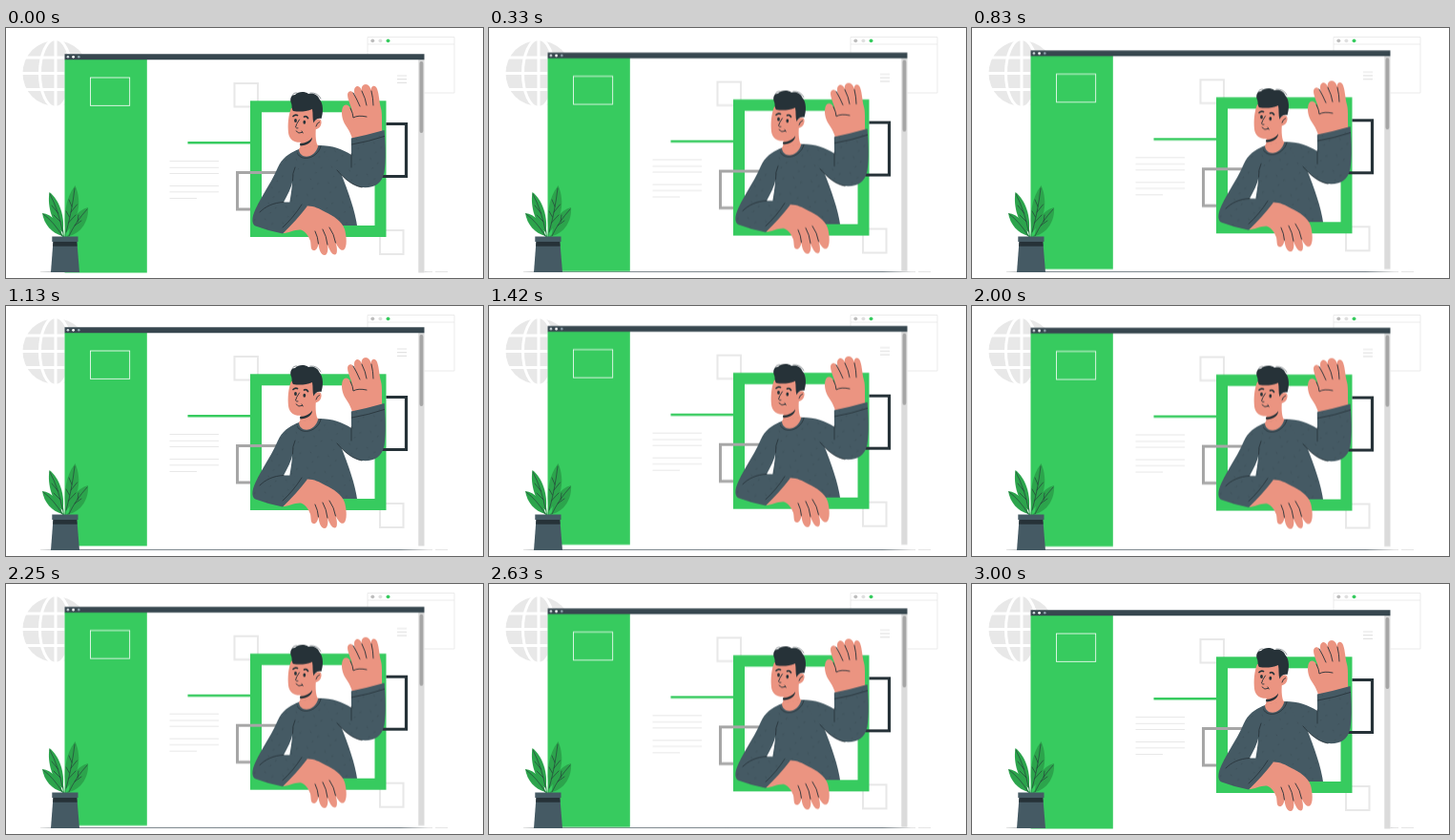
Animation, 500 px wide and 262 px high, one loop 3040 ms. Source, as an HTML page:

```html
<!DOCTYPE html>
<html lang="en">
<head>
<meta charset="utf-8">
<title>Waving from a web page</title>
<style>
  html, body { margin: 0; width: 100%; height: 100%; overflow: hidden; background: #fff; }
  svg { display: block; width: 100vw; height: 100vh; }
  .float { animation: float 3040ms linear infinite; }
  /* straight up and down in 3 s, then a 40 ms rest */
  @keyframes float {
    0%, 98.684%, 100% { transform: translateY(0); }
    49.342% { transform: translateY(-6.67px); }
  }
  .line { fill: none; stroke: #263238; stroke-linecap: round; stroke-linejoin: round; }
  .green { fill: #37cb5f; }
  .skin { fill: #eb9481; }
  .dark { fill: #263238; }
  .knit { fill: #455a64; }
  .box { fill: none; }
</style>
</head>
<body>
<svg viewBox="0 0 500 262">
  <defs>
    <pattern id="ticks" width="19" height="17" patternUnits="userSpaceOnUse" patternTransform="rotate(12)">
      <path class="line" stroke-width=".5" opacity=".6" d="M3 3l.7 1M12 6l-.3 1.100M7 13l.8-.4"/>
    </pattern>
    <linearGradient id="fade" gradientUnits="userSpaceOnUse" x1="36" y1="0" x2="464" y2="0">
      <stop offset="0" stop-color="#ddd"/>
      <stop offset=".07" stop-color="#55626a"/>
      <stop offset=".88" stop-color="#55626a"/>
      <stop offset=".95" stop-color="#ddd"/>
    </linearGradient>
    <path id="torso" d="M307 127C299 130 292 137 289 145L300 160C300 169 298 177 297 185L300 207H368C366 192 359 172 351 152C352 138 342 126 328 123Z"/>
    <path id="raised" d="M328 123C342 123 353 127 362 133L361.800 115.500Q379 112 396.500 107C398 123 398.500 139 396.500 151C394 164 385 168 373 167C362 165 354 157 347 149Z"/>
    <path id="resting" d="M306 128C296 131 289 137 285 146C281 156 275 165 270 174C265 183 260 191 258.500 199C258 204 259 207 263 208Q276 213 290 215.500C299 207 308 197 316 186.500C309 184 299 182 291 182.500C295 175 299 168 300.500 160Z"/>
  </defs>

  <!-- globe -->
  <circle cx="52" cy="47.500" r="34.500" fill="#e8e8e8"/>
  <g fill="none" stroke="#fff" stroke-width="3">
    <ellipse cx="52" cy="47.500" rx="16.500" ry="36"/>
    <path d="M52 12V83M16 47.500H88M20 31H84M20 64.500H84"/>
  </g>

  <!-- small window behind -->
  <g fill="#fff" stroke="#e6e6e6" stroke-width=".8">
    <path d="M379 9.500H470V68H379ZM379 17H470"/>
  </g>
  <circle cx="384.300" cy="13.300" r="1.900" fill="#bdbdbd"/>
  <circle cx="392.400" cy="13.300" r="1.900" fill="#e0e0e0"/>
  <circle cx="400.500" cy="13.300" r="1.900" class="green"/>

  <!-- floor -->
  <path fill="none" stroke="url(#fade)" stroke-width=".8" d="M36 255.400L447 255.500M450 255.400L463 255.500"/>

  <g class="float">
    <!-- page -->
    <path fill="#fff" d="M61.500 27.500H438.500V256H61.500Z"/>
    <path class="green" d="M61.500 33H147.800V256.500H61.500Z"/>
    <path fill="#dbdbdb" d="M432.300 33H438.500V256.500H432.300Z"/>
    <rect x="433.500" y="35" width="3.800" height="75" rx="1.900" fill="#a6a6a6"/>
    <path fill="#37474f" d="M61.500 27.300H438.500V33.300H61.500Z"/>
    <g fill="#fff">
      <circle cx="64.900" cy="30.300" r="1.300" fill="#cfd8dc"/>
      <circle cx="70.600" cy="30.300" r="1.400"/>
      <circle cx="76.300" cy="30.300" r="1.300" fill="#90a4ae"/>
    </g>
    <rect class="box" x="88.500" y="52" width="41.200" height="29.300" stroke="#fff" stroke-width=".8"/>

    <g fill="none" stroke="#e3e3e3">
      <path stroke-width=".8" d="M171.500 139.500H223M171.500 146.300H223M171.500 152.500H223M171.500 165.500H223M171.500 171.800H223M171.500 178.500H200"/>
      <path stroke-width="1.200" d="M410 50H420M410 53.700H420M410 57.400H420"/>
      <path stroke="#e8e8e8" stroke-width="2" d="M239.500 58H264V82.500H239.500ZM392 212H416.500V237H392Z"/>
    </g>

    <!-- interlocked frames -->
    <rect class="box" x="262" y="82.300" width="130.500" height="130.700" stroke="#37cb5f" stroke-width="12"/>
    <path class="box" stroke="#a6a6a6" stroke-width="3" d="M288 151.500H242.500V190H256"/>
    <path class="box" stroke="#263238" stroke-width="3.200" d="M398.500 100.500H419.500V155.500H390"/>
    <path class="box" stroke="#37cb5f" stroke-width="2.400" d="M190.500 120.300H257"/>

    <!-- raised hand -->
    <path class="skin" d="M364 124C364 116 361 109 356 102C352 96 351 88 353 83C355 79 359 80 361 84L363 88C362 82 358 75 358 70C358 66 362 65 364 68L366 72C365 68 364 63 367 61.500C370 60 372 63 373 66C372 62 374 59 377 59C380 59 382 62 383 66C382 62 385 59 388 62C391 66 391 77 393 84C395 91 393 102 395 118Z"/>
    <path class="line" stroke-width=".9" d="M364 68Q368 75 371 82M373 66Q377 74 378 81M383 66Q385 74 385 81M361 84Q364 90 364 94Q369 91 378 93"/>

    <!-- neck -->
    <path class="skin" d="M308 112C309 122 309 125 306.500 129C311 140 325 137 327.500 125C325 121 324 113 325 104Z"/>
    <path class="dark" d="M308 121C314 121 319 118 321 114.500C321 120 315 123.500 308.400 123.500Z"/>

    <!-- sweater -->
    <use href="#torso" class="knit"/>
    <use href="#torso" fill="url(#ticks)"/>
    <use href="#raised" class="knit"/>
    <use href="#raised" fill="url(#ticks)"/>
    <path class="skin" d="M307 126.500C307 138 324 138 327.500 122.500Z"/>
    <path class="line" stroke-width=".8" d="M304.500 129C307 141 326 138 330 124M362 132V146M362.500 122Q380 119 396.500 113.500M347 149C354 157 362 165 373 167"/>

    <!-- head -->
    <path class="skin" d="M299 84C296 91 295 101 296 110C297 118 304 121 311 119.500C318 118 322 112 323 106C328 107 331 102 330.500 98C330 94 325 95 323 98L322 82Z"/>
    <path class="dark" d="M301 87C299 84 300 81 299 79C297 74 299 70 303 70C306 66.500 313 66 317 69C322 68 327 70 328.500 74.500C333 79 332.500 89 330.500 95C327 94 324 96 322.500 99.500C321 95 322 90 321 85C314 88 307 88 301 87Z"/>
    <path class="line" stroke-width=".5" d="M300 71Q301 67.500 305 68M319 68Q327 67.500 330 74"/>
    <ellipse class="dark" cx="303.500" cy="97" rx="1.400" ry="2"/>
    <ellipse class="dark" cx="312.800" cy="98.700" rx="1.400" ry="2"/>
    <path class="line" stroke-width="1.700" d="M301 92.500Q303 90.500 305.500 91.500M312.500 93Q315 92 316.500 94.500"/>
    <path class="line" stroke-width=".9" d="M307.500 96Q304 101 303.500 104Q304.500 105.500 306 105M304 108Q306.500 111.500 310.500 109.500M310 108L311.200 110M325 103Q326 99 328.500 98.500"/>

    <!-- resting arm -->
    <path class="skin" d="M290 215C296 215 303 211 309 211.500C314 213 317 218 319 223C320 228 319 232 322 233C325 234 327 230 327.500 226C328 232 330 238 334 238C337 238 338 232 337 227C339 233 342 238 345 237.500C348 237 347 229 345.500 225C348 230 351 234 354 232.500C358 230 357 218 355 211C352 202 343 197 335 193C328 189 322 186 315 186.500Z"/>
    <path class="line" stroke-width=".9" d="M327.500 226Q327 219 324 213M337 227Q336 218 332 211M345.500 225Q344 216 339 209"/>
    <use href="#resting" class="knit"/>
    <use href="#resting" fill="url(#ticks)"/>
    <path class="line" stroke-width=".8" d="M310 185Q301 199 290 209M291 182.500C280 183 272 187 266 193M300.500 160Q300 152 303 146"/>
  </g>

  <!-- plant -->
  <path fill="none" stroke="#2ca44c" stroke-width="1.200" d="M59 208L60.500 219M63.500 208L62 219M57 215L60 219M68 215L64 219"/>
  <g fill="#2ca44c">
    <path d="M59 218C48 215 40 206 38 194C48 195 57 205 59 218Z"/>
    <path d="M59.500 214C49 206 43 188 45.500 172C56 180 62 198 59.500 214Z"/>
    <path d="M66 218C66 204 74 191 86 188C87 202 79 215 66 218Z"/>
    <path d="M63 214C60 198 62 178 72.500 165C80 182 76 202 63 214Z"/>
  </g>
  <path class="line" stroke-width=".6" d="M59 218Q50 203 39 195M59.500 214Q55 191 46 174M66 218Q73 203 85 190M63 214Q69 193 72 168M65.500 204L73 196M68 193L74.500 185M66.500 198L63 192M69 187L66 180M57 203L50 196M54.500 194L48 186M72 207L79 202M75 203L76 196"/>
  <path class="knit" d="M49.500 223H74.300L77 256H47Z"/>
  <path class="dark" d="M49.600 223H74.200L74.600 228.700H49.100Z"/>
  <path class="knit" d="M48.300 218.500H75.500V224H48.300Z"/>
</svg>
</body>
</html>
```
